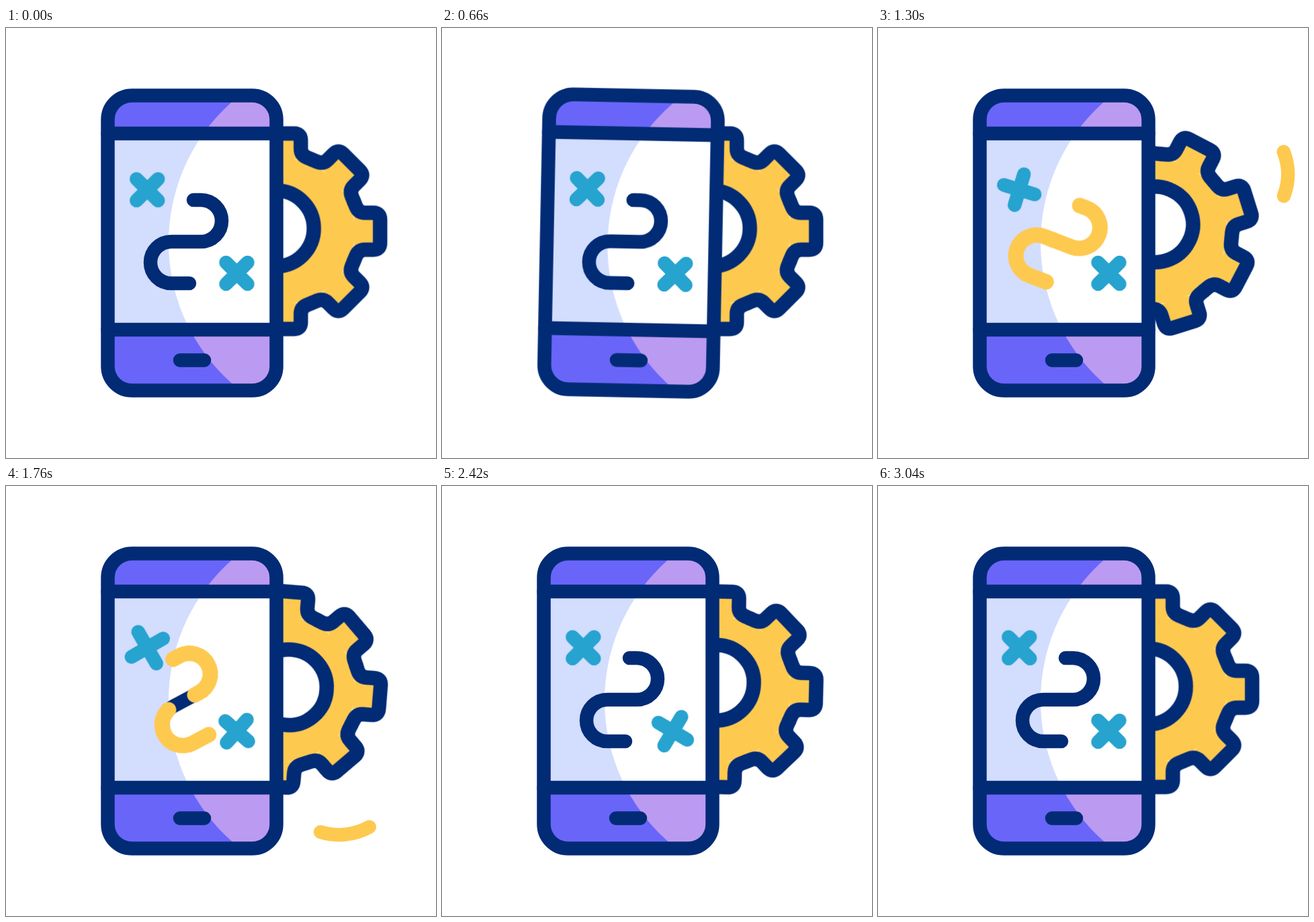
Animation, 640 px wide and 640 px high, one loop 3300 ms. Source, as an HTML page without scripts:

```html
<!DOCTYPE html>
<html lang="en">
<head>
<meta charset="utf-8">
<title>Phone strategy</title>
<style>
  html, body { margin: 0; width: 100%; height: 100%; overflow: hidden; background: #fff; }
  svg { display: block; width: 100vw; height: 100vh; }

  .line { fill: none; stroke: #022b75; stroke-width: 20.5; stroke-linecap: round; stroke-linejoin: round; }
  .yellow { stroke: #fec94f; }
  .ink { stroke-width: 23; }
  .teal { stroke: #27a3cf; vector-effect: non-scaling-stroke; }
  .tooth { fill: #fec94f; stroke-width: 21.5; }

  .phone, .gear, .route, .cross, .ink, .sweep {
    animation: 3300ms ease-in-out infinite;
  }
  .phone { animation-name: tilt; transform-origin: 277px 540px; }
  .gear { animation-name: turn; }
  .route { animation-name: swing; transform-origin: 267.5px 317.5px; }
  .cross { animation-name: wiggle; }
  .cross.late { animation-delay: 940ms; }

  /* A zero-length dash with a positive offset lies off the path, so it is hidden. */
  .ink, .sweep { stroke-dasharray: 0 300; stroke-dashoffset: 1; animation-timing-function: linear; }
  .ink { animation-name: fill; }
  .sweep.out { animation-name: sweep-out; }
  .sweep.back { animation-name: sweep-back; }

  @keyframes tilt {
    0%, 6.06% { transform: rotate(0deg); }
    12.12% { transform: rotate(-3deg); }
    24.85% { transform: rotate(2.9deg); }
    36.36%, 100% { transform: rotate(0deg); }
  }
  @keyframes turn {
    0%, 23.64% { transform: rotate(0deg); }
    54.55% { transform: rotate(140deg); }
    85.9%, 100% { transform: rotate(0deg); }
  }
  @keyframes swing {
    0%, 23.64% { transform: rotate(0deg); }
    39.4% { transform: rotate(21deg); }
    53.33% { transform: rotate(-28deg); }
    72%, 100% { transform: rotate(0deg); }
  }
  @keyframes wiggle {
    0%, 20% { transform: rotate(0deg) scale(1); }
    39.4% { transform: rotate(-28deg) scale(1.06); }
    53.33% { transform: rotate(15deg) scale(1.2); }
    63.64%, 100% { transform: rotate(0deg) scale(1); }
  }
  @keyframes fill {
    0%, 22.7% { stroke-dasharray: 0 300; stroke-dashoffset: 1; }
    23.64% { stroke-dasharray: 3.7 300; stroke-dashoffset: 0; animation-timing-function: ease-out; }
    38%, 47.9% { stroke-dasharray: 50 300; stroke-dashoffset: 0; animation-timing-function: ease-in; }
    53.33% { stroke-dasharray: 42 300; stroke-dashoffset: 0; animation-timing-function: ease-out; }
    68.4% { stroke-dasharray: 0 300; stroke-dashoffset: 0; }
    68.5%, 100% { stroke-dasharray: 0 300; stroke-dashoffset: 1; }
  }
  @keyframes sweep-out {
    0%, 22.7% { stroke-dasharray: 0 300; stroke-dashoffset: 1; }
    23.64% { stroke-dasharray: 34.6 300; stroke-dashoffset: 0; }
    31.5% { stroke-dasharray: 70 300; stroke-dashoffset: -25; }
    39.4% { stroke-dasharray: 36.6 300; stroke-dashoffset: -63.4; }
    44.8%, 100% { stroke-dasharray: 0 300; stroke-dashoffset: -101; }
  }
  @keyframes sweep-back {
    0%, 52.3% { stroke-dasharray: 0 300; stroke-dashoffset: 1; }
    53.33% { stroke-dasharray: 43 300; stroke-dashoffset: 0; }
    60.6% { stroke-dasharray: 70 300; stroke-dashoffset: -28; }
    67.88% { stroke-dasharray: 27 300; stroke-dashoffset: -73; }
    71.5%, 100% { stroke-dasharray: 0 300; stroke-dashoffset: -101; }
  }
</style>
</head>
<body>
<svg viewBox="0 0 640 640">
  <defs>
    <clipPath id="body"><rect x="151.5" y="100.5" width="251" height="439" rx="36"/></clipPath>
    <clipPath id="screen"><rect x="151.5" y="157" width="251" height="292"/></clipPath>
    <path id="tooth" class="line tooth" d="M-44.2-106.6 L-36.7-109.7 Q-27.5-113.5-27.5-123 V-135.5 Q-27.5-145.5-17.5-145.5 H17.5 Q27.5-145.5 27.5-135.5 V-123 Q27.5-113.5 36.7-109.7 L44.2-106.6"/>
    <path id="cross" class="line teal" d="M-16-16 16 16M-16 16 16-16"/>
  </defs>

  <g transform="translate(411.3 302.5)">
    <g class="gear">
      <circle r="108" fill="#fec94f"/>
      <use href="#tooth"/>
      <use href="#tooth" transform="rotate(45)"/>
      <use href="#tooth" transform="rotate(90)"/>
      <use href="#tooth" transform="rotate(135)"/>
      <use href="#tooth" transform="rotate(180)"/>
      <use href="#tooth" transform="rotate(225)"/>
      <use href="#tooth" transform="rotate(270)"/>
      <use href="#tooth" transform="rotate(315)"/>
      <circle class="line" cx="-9.3" cy="-4.2" r="56.2" style="fill: #fff; stroke-width: 21.5"/>
    </g>
  </g>

  <path class="line yellow sweep out" pathLength="100" d="M510 128 A90 90 0 0 1 604 250"/>
  <path class="line yellow sweep back" pathLength="100" d="M468 515 A94 94 0 0 0 589.5 427"/>

  <g class="phone">
    <g clip-path="url(#body)">
      <path fill="#6965f9" d="M141 90H413V550H141z"/>
      <circle cx="522" cy="319.5" r="280" fill="#bb9af2"/>
      <g clip-path="url(#screen)">
        <path fill="#d3ddfe" d="M141 150H413V455H141z"/>
        <circle cx="522" cy="319.5" r="280" fill="#fff"/>
      </g>
    </g>
    <rect class="line" x="151.5" y="100.5" width="251" height="439" rx="36"/>
    <path class="line" d="M151.5 157H402.5M151.5 449H402.5M259 494.5H295"/>

    <g class="route">
      <path class="line" d="M279 256H290A31 31 0 0 1 290 318H246A31 31 0 0 0 246 380H273"/>
      <path class="line yellow ink" pathLength="100" d="M279 256H290A31 31 0 0 1 290 318H246A31 31 0 0 0 246 380H273"/>
      <path class="line yellow ink" pathLength="100" d="M273 380H246A31 31 0 0 1 246 318H290A31 31 0 0 0 290 256H279"/>
    </g>

    <g transform="translate(210.3 240.7)"><g class="cross"><use href="#cross"/></g></g>
    <g transform="translate(343.5 365)"><g class="cross late"><use href="#cross"/></g></g>
  </g>
</svg>
</body>
</html>
```
